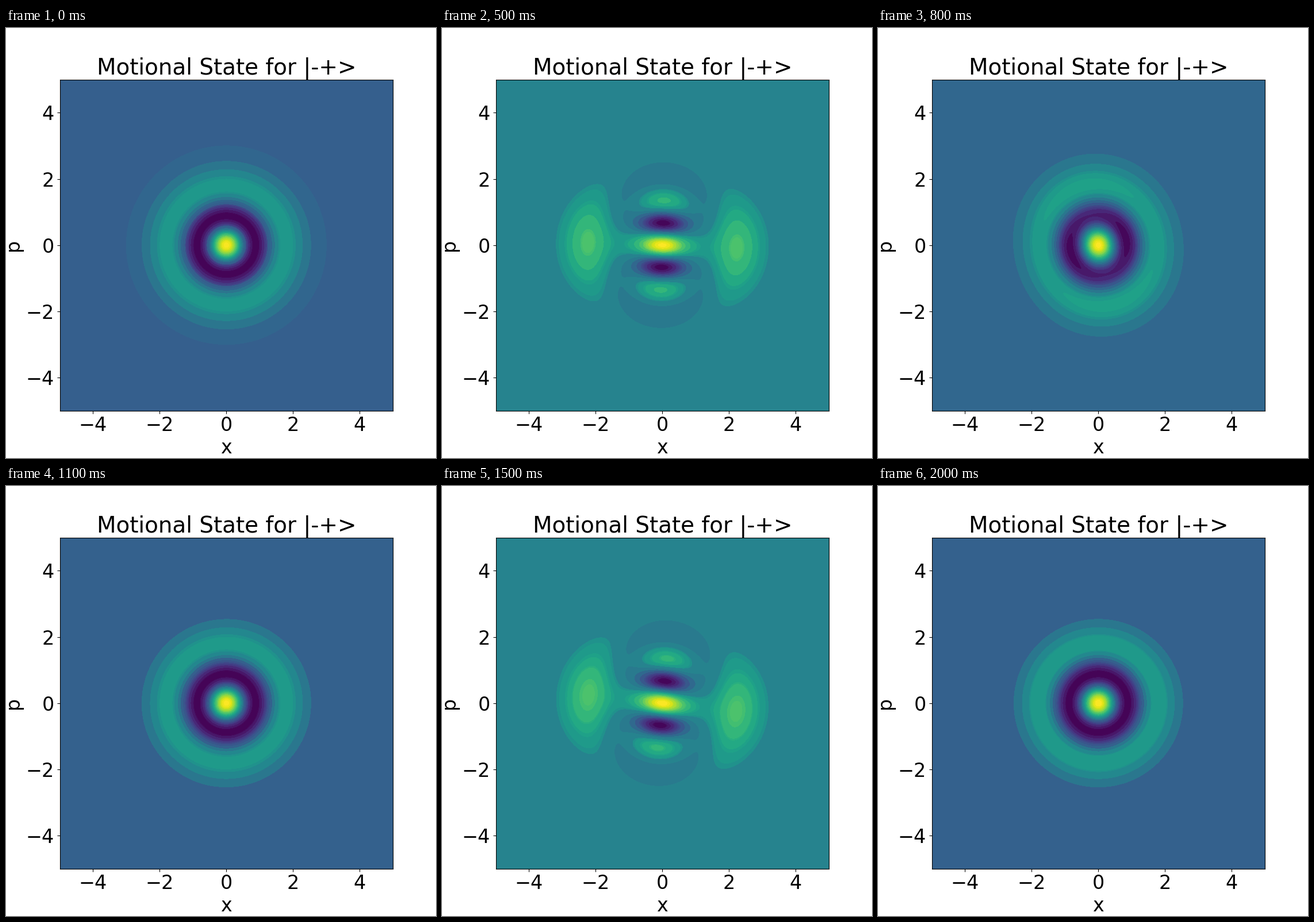
These frames come from a looping animation (748x748 px, 2100 ms). A matplotlib script:

```python
import numpy as np
import matplotlib.pyplot as plt
from matplotlib.animation import FuncAnimation

FRAMES, INTERVAL = 21, 100
PERIOD = 10.12        # frames per loop in phase space
REACH = 0.755         # largest displacement
STEP = 0.005 * np.pi  # height of one contour layer
SIZE = 7.48

plt.rcParams.update({"font.family": "DejaVu Sans", "font.size": 24})

axis = np.linspace(-5, 5, 401)
X, P = np.meshgrid(axis, axis)
VIRIDIS = np.round(plt.get_cmap("viridis")(np.arange(256))[:, :3] * 255).astype(int)


def fock2(r2):
    """Wigner function of the n=2 Fock state, scaled to 1 at the origin."""
    return np.exp(-r2) * (1 - 4 * r2 + 2 * r2**2)


def wigner(i):
    """Even superposition of two displaced Fock states on a cardioid path."""
    phase = 2 * np.pi * i / PERIOD
    d = REACH * np.sin(phase / 2) ** 2
    u = X * np.cos(phase) + P * np.sin(phase)
    v = P * np.cos(phase) - X * np.sin(phase)
    lobes = fock2((u - d) ** 2 + v**2) + fock2((u + d) ** 2 + v**2)
    fringes = 2 * np.cos(2 * d * v) * fock2(u**2 + v**2)
    return (lobes + fringes) / (2 + 2 * fock2(d * d))


def bands(w, i):
    """Merge contour layers of similar colour into flat bands."""
    lo, hi = w.min(), w.max() * (1 - 0.018 * i / (FRAMES - 1))
    layer = np.floor((w + 1e-4) / STEP).astype(int)
    first = layer.min()
    weight = np.bincount((layer - first).ravel()) + 1e-6
    k = first + np.arange(len(weight))
    level = ((k + 0.5) * STEP - lo) / (hi - lo)
    rgb = VIRIDIS[np.clip((level * 256).astype(int), 0, 255)]
    key = rgb // [32, 16, 32] @ [256, 16, 1]

    starts = np.flatnonzero(np.r_[True, key[1:] != key[:-1]])
    colors = []
    for s in starts:
        same = key == key[s]
        colors.append(np.average(rgb[same], axis=0, weights=weight[same]) / 255)
    edges = np.r_[w.min() - 1, k[starts[1:]] * STEP - 1e-4, w.max() + 1]
    return edges, colors


fig, ax = plt.subplots(figsize=(SIZE, SIZE), dpi=100)
ax.set(xlim=(-5, 5), ylim=(-5, 5), xlabel="x", ylabel="p")
ax.set_xticks(range(-4, 5, 2))
ax.set_yticks(range(-4, 5, 2))
ax.set_title("Motional State for |-+>", fontsize=28)
drawn = []


def draw(i):
    while drawn:
        drawn.pop().remove()
    w = wigner(i)
    edges, colors = bands(w, i)
    drawn.append(ax.contourf(X, P, w, levels=edges, colors=colors))
    return drawn


anim = FuncAnimation(fig, draw, frames=FRAMES, init_func=lambda: [],
                     interval=INTERVAL, repeat=True, repeat_delay=0, blit=False)
plt.show()
```
